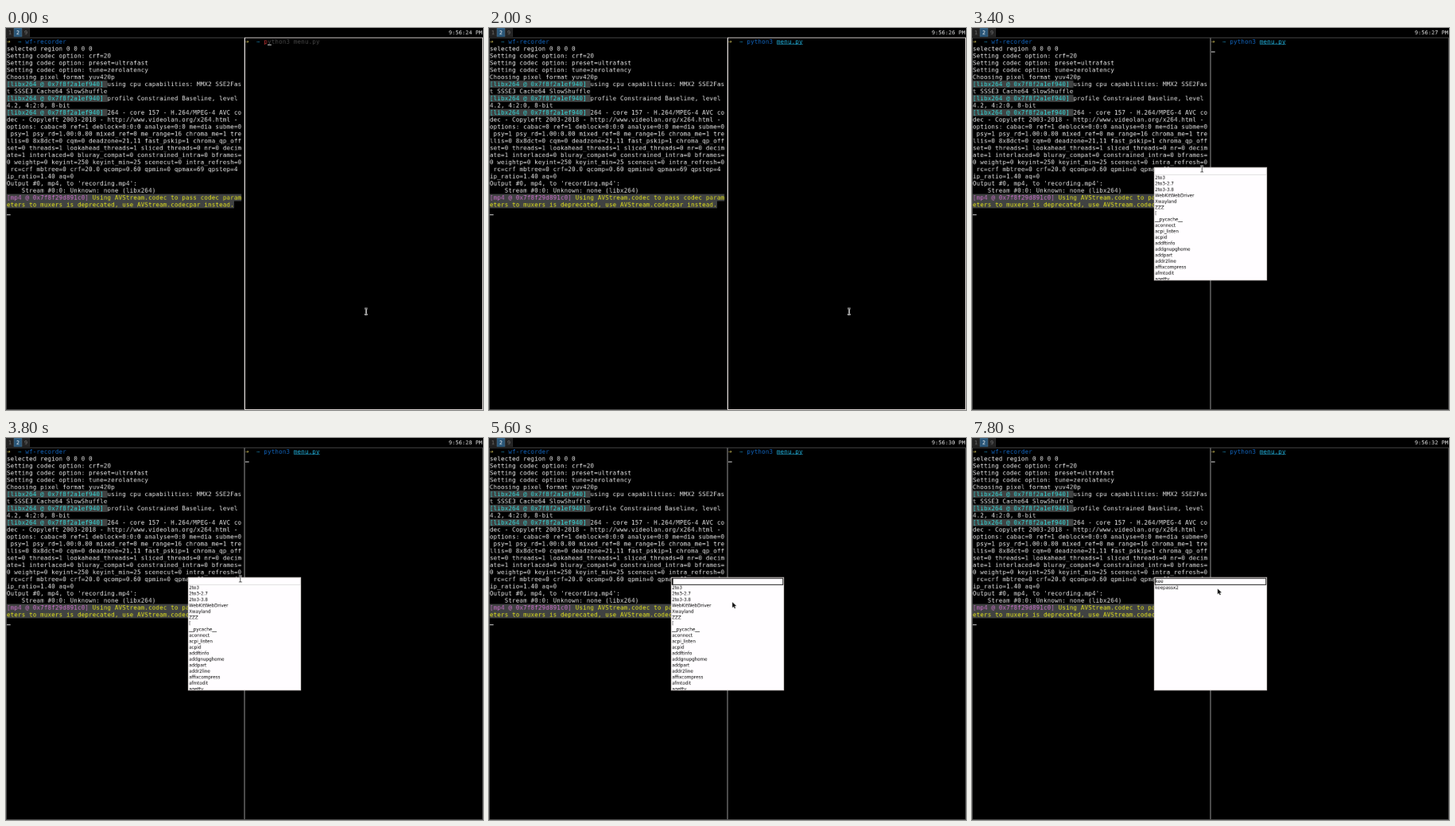
Write an HTML page with a canvas that moves like this. It is 600 px wide and 480 px high and loops after 8 s.

```html
<!DOCTYPE html>
<html lang="en">
<head>
<meta charset="utf-8">
<title>Menu launcher</title>
<style>
  html, body { margin: 0; width: 100%; height: 100%; overflow: hidden; background: #000; }
  canvas { display: block; }
</style>
</head>
<body>
<canvas id="stage" width="600" height="480"></canvas>
<script>
// The desktop is drawn at 1280x1024 and scaled down to the stage.
const stage = document.getElementById('stage').getContext('2d');
const desktop = document.createElement('canvas');
desktop.width = 1280;
desktop.height = 1024;
const ctx = desktop.getContext('2d');

const LOOP = 8000, STEP = 100;
const MONO = '"DejaVu Sans Mono", monospace', SANS = '"DejaVu Sans", sans-serif';
const CELL = { w: 10, h: 19 }, COLUMNS = 63, TOP = 25;
const WHITE = '#ececec', BLUE = '#1268c4', CYAN = '#34dede', YELLOW = '#e6e619', SHADE = '#404242';
const FOCUSED = '#dcd6d4', UNFOCUSED = '#4c4c4c';
const PROMPT = [['➜', '#c0b050'], ['  ~ ', '#1c86b0']];
const COMMAND = 'python3 menu.py';

const TAG = ['[libx264 @ 0x7f8f2a1ef940] ', CYAN, SHADE];
const RECORDING = [
  ...PROMPT, ['wf-recorder\n', BLUE],
  [`selected region 0 0 0 0
Setting codec option: crf=20
Setting codec option: preset=ultrafast
Setting codec option: tune=zerolatency
Choosing pixel format yuv420p
`],
  TAG, ['using cpu capabilities: MMX2 SSE2Fast SSSE3 Cache64 SlowShuffle\n'],
  TAG, ['profile Constrained Baseline, level 4.2, 4:2:0, 8-bit\n'],
  TAG, ['264 - core 157 - H.264/MPEG-4 AVC codec - Copyleft 2003-2018 - ' +
    'http://www.videolan.org/x264.html - options: cabac=0 ref=1 deblock=0:0:0 analyse=0:0 ' +
    'me=dia subme=0 psy=1 psy_rd=1.00:0.00 mixed_ref=0 me_range=16 chroma_me=1 trellis=0 ' +
    '8x8dct=0 cqm=0 deadzone=21,11 fast_pskip=1 chroma_qp_offset=0 threads=1 ' +
    'lookahead_threads=1 sliced_threads=0 nr=0 decimate=1 interlaced=0 bluray_compat=0 ' +
    'constrained_intra=0 bframes=0 weightp=0 keyint=250 keyint_min=25 scenecut=0 ' +
    'intra_refresh=0 rc=crf mbtree=0 crf=20.0 qcomp=0.60 qpmin=0 qpmax=69 qpstep=4 ' +
    'ip_ratio=1.40 aq=0\n'],
  ["Output #0, mp4, to 'recording.mp4':\n    Stream #0:0: Unknown: none (libx264)\n"],
  ['[mp4 @ 0x7f8f29d891c0] ', '#d070d0', SHADE],
  ['Using AVStream.codec to pass codec parameters to muxers is deprecated, ' +
    'use AVStream.codecpar instead.', YELLOW, SHADE],
];

const PROGRAMS = `2to3 2to3-2.7 2to3-3.8 WebKitWebDriver Xwayland ZZZ [ __pycache__ aconnect
  acpi_listen acpid addftinfo addgnupghome addpart addr2line affixcompress afmtodit agetty
  awk blkdeactivate blkdiscard blkid blkmapd blkzone blockdev cmake fakeroot gawk gtk-launch
  gtk-query-settings gtk-update-icon-cache keepassx2 keyctl kill killall kmod make`.split(/\s+/);
const ROWS = 18, ROW_HEIGHT = 16;
const POPUP = { x: 488, y: 373, size: 304 };

// Pointer keyframes: time, x, y
const POINTER = [
  [0, 966, 760], [2800, 966, 760], [3400, 617, 378], [3600, 623, 358], [3800, 629, 378],
  [4100, 653, 440], [7000, 653, 440], [7250, 677, 428], [7500, 659, 404], [LOOP, 659, 404],
];

// Latest value whose start time has passed
const at = (t, steps) => steps.filter(([start]) => t >= start).pop()[1];

function rect(x, y, w, h, color) {
  ctx.fillStyle = color;
  ctx.fillRect(x, y, w, h);
}

function frame(x, y, w, h, thickness, color) {
  ctx.strokeStyle = color;
  ctx.lineWidth = thickness;
  ctx.strokeRect(x + thickness / 2, y + thickness / 2, w - thickness, h - thickness);
}

function label(text, x, baseline, font, color) {
  ctx.font = font;
  ctx.fillStyle = color;
  ctx.fillText(text, x, baseline);
}

// Writes coloured spans on a character grid, wrapping at the last column.
function terminal(left, spans) {
  let col = 0, row = 0;
  for (const [text, color = WHITE, background, underline] of spans) {
    for (const char of text) {
      if (char === '\n') { col = 0; row++; continue; }
      if (col === COLUMNS) { col = 0; row++; }
      const x = left + 2 + col++ * CELL.w, y = TOP + 2 + row * CELL.h;
      if (background) rect(x, y, CELL.w, CELL.h, background);
      label(char, x, y + 15, `16px ${MONO}`, color);
      if (underline) rect(x, y + 16, CELL.w, 1, color);
    }
  }
}

function caret(left, col, row) {
  rect(left + 2 + col * CELL.w, TOP + 2 + (row + 1) * CELL.h - 2, CELL.w, 2, WHITE);
}

function bar(t) {
  ['1', '2', '9'].forEach((name, i) => {
    const x = i * 21.5, active = name === '2';
    rect(x, 0, 21, 24, active ? '#285577' : '#222');
    frame(x, 0, 21, 24, 1, active ? '#4c7899' : '#333');
    label(name, x + 6, 17, `14.67px ${MONO}`, active ? '#fff' : '#777');
  });
  const seconds = 25 + Math.floor((t - 568) / 1005);
  [...`9:56:${seconds} PM`].forEach((char, i) =>
    label(char, 1188 + i * 9, 17, `14.67px ${MONO}`, WHITE));
}

function shell(t) {
  const typed = at(t, [[0, 1], [500, 2], [700, 3], [800, 4], [1100, 5], [1200, COMMAND.length]]);
  const accepted = typed === COMMAND.length;
  terminal(640, [...PROMPT, ...(accepted
    ? [['python3 ', BLUE], ['menu.py', '#22b4e0', null, true]]
    : [[COMMAND.slice(0, typed), '#c83434'], [COMMAND.slice(typed), '#484848']])]);
  if (t < 1400) caret(640, 5 + typed, 0);
  else if (t >= 2200) caret(640, 0, 1);
}

function popup(t, focused) {
  const { x, y, size } = POPUP, left = x + 2, top = y + 2;
  rect(x, y, size, size, '#fffdff');
  frame(x, y, size, size, 2, focused ? FOCUSED : UNFOCUSED);
  if (t < 2200) return;

  const active = t >= 4400;
  const query = at(t, [[0, ''], [5800, 'k'], [6200, 'ke'], [6300, 'kee']]);
  const font = `12px ${SANS}`;
  frame(left, top, size - 4, 19, active ? 2 : 1, active ? '#111' : '#d0d0d0');
  label(query, left + 2, top + 13, font, '#000');
  if (active && (t - 4400) % 900 < 600) {
    rect(left + 2 + ctx.measureText(query).width, top + 2, 2, 15, '#000');
  }

  ctx.save();
  ctx.beginPath();
  ctx.rect(left, top, size - 4, size - 4);
  ctx.clip();
  PROGRAMS.filter(name => name.includes(query)).slice(0, ROWS).forEach((name, i) =>
    label(name, left + 1, top + 30 + i * ROW_HEIGHT, font, '#000'));
  ctx.restore();
}

function pointer(t) {
  const next = POINTER.findIndex(([time]) => time > t);
  const [t0, x0, y0] = POINTER[next - 1], [t1, x1, y1] = POINTER[next];
  const k = (t - t0) / (t1 - t0), x = x0 + (x1 - x0) * k, y = y0 + (y1 - y0) * k;
  const overList = x > POPUP.x && x < POPUP.x + POPUP.size &&
    y > POPUP.y + 21 && y < POPUP.y + POPUP.size;
  const shape = new Path2D(overList
    ? 'M0 0V15L3.5 11.5 6 17 8.5 16 6 10.5H11Z'
    : 'M-4 -8H-1L0 -7 1 -8H4M0 -7V7M-4 8H-1L0 7 1 8H4');
  ctx.save();
  ctx.translate(x, y);
  ctx.strokeStyle = '#fff';
  ctx.lineWidth = overList ? 2.5 : 4;
  ctx.stroke(shape);
  ctx.fillStyle = ctx.strokeStyle = '#111';
  ctx.lineWidth = 1.5;
  if (overList) ctx.fill(shape);
  else ctx.stroke(shape);
  ctx.restore();
}

function draw(t) {
  const focus = at(t, [[0, 'right'], [2100, 'popup'], [3500, 'left'], [3800, 'popup']]);
  rect(0, 0, 1280, 1024, '#000');
  bar(t);
  for (const [name, x] of [['left', 0], ['right', 640]]) {
    frame(x, TOP, 640, 1024 - TOP, 2, focus === name ? FOCUSED : UNFOCUSED);
  }
  terminal(0, RECORDING);
  caret(0, 0, 24);
  shell(t);
  if (t >= 2100) popup(t, focus === 'popup');
  pointer(t);

  stage.imageSmoothingQuality = 'high';
  stage.drawImage(desktop, 0, 0, 600, 480);
}

const start = performance.now();
let shown = -1;
function tick() {
  const t = Math.floor((performance.now() - start) % LOOP / STEP) * STEP;
  if (t !== shown) draw(shown = t);
  requestAnimationFrame(tick);
}
tick();
</script>
</body>
</html>
```
